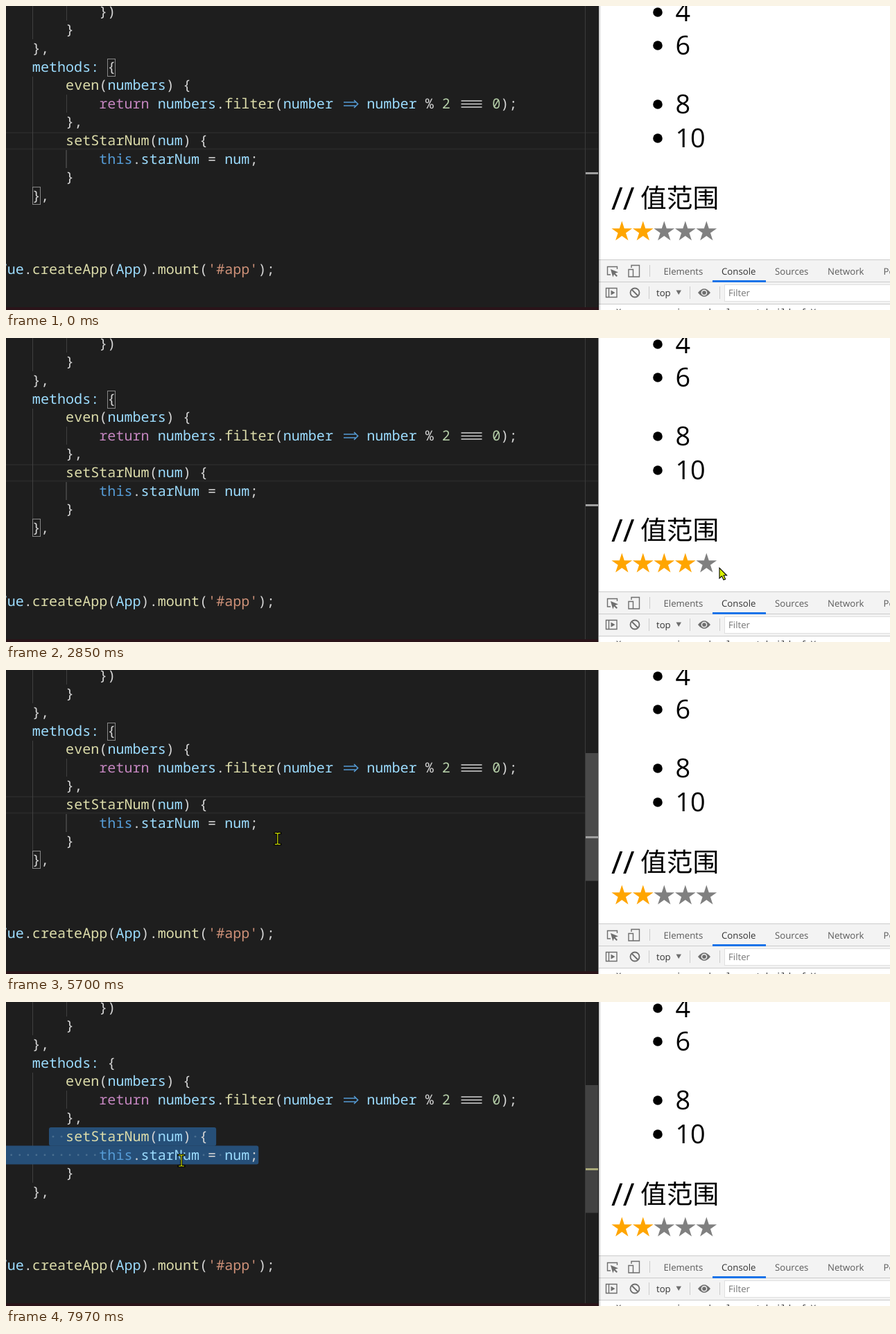
An HTML page for the animation above (8 s loop, 1275 by 439 pixels).

```html
<!DOCTYPE html>
<html lang="zh">
<head>
<meta charset="utf-8">
<title>Star rating</title>
<style>
  html, body { margin: 0; height: 100%; overflow: hidden; background: #1e1e1e; }
  svg { display: block; width: 100vw; height: 100vh; }
  text { white-space: pre; text-rendering: geometricPrecision; }
  .code { font: 500 20.1px "Noto Sans Mono", "DejaVu Sans Mono", monospace; }
  .page { font: 37.8px "Open Sans", "Noto Sans", sans-serif; }
  .slash { font: 45px "Noto Sans", "Open Sans", sans-serif; }
  .cjk { font: 37.7px "Noto Sans CJK SC", "Noto Sans CJK JP", "Noto Sans CJK", sans-serif; }
  .tool { font: 13.2px "Open Sans", "Noto Sans", sans-serif; }
  .log { font: 12px "Noto Sans Mono", monospace; }
</style>
</head>
<body>
<svg id="stage" viewBox="0 0 1275 439"></svg>
<script>
const LOOP = 8000;
const CW = 12.06, LH = 26.6, X0 = -10.4, Y0 = -5.2;
const stage = document.getElementById('stage');

function add(parent, tag, attrs, text) {
  const node = document.createElementNS('http://www.w3.org/2000/svg', tag);
  set(node, attrs);
  if (text) node.textContent = text;
  parent.append(node);
  return node;
}
function set(node, attrs) {
  for (const k in attrs) node.setAttribute(k, attrs[k]);
}
const group = (parent = stage) => add(parent, 'g', {});
const rect = (p, x, y, width, height, fill, more) =>
  add(p, 'rect', { x, y, width, height, fill, ...more });
const stroke = (p, d, color, w = 1, more) =>
  add(p, 'path', { d, stroke: color, 'stroke-width': w, fill: 'none', ...more });
const label = (p, cls, x, y, fill, text) => add(p, 'text', { class: cls, x, y, fill }, text);
const show = (node, on) => node.setAttribute('visibility', on ? 'visible' : 'hidden');
const colX = c => X0 + c * CW;
const rowY = r => Y0 + r * LH;

// Editor
const INK = { v: '#9cdcfe', f: '#dcdcaa', c: '#c586c0', k: '#569cd6', n: '#b5cea8', s: '#ce9178', d: '#d4d4d4' };
// row, column, then colour key and text in turn
const LINES = [
  [0, 12, 'd', '})'],
  [1, 8, 'd', '}'],
  [2, 4, 'd', '},'],
  [3, 4, 'v', 'methods:', 'd', ' {'],
  [4, 8, 'f', 'even', 'd', '(', 'v', 'numbers', 'd', ') {'],
  [5, 12, 'c', 'return ', 'v', 'numbers', 'd', '.', 'f', 'filter', 'd', '(', 'v', 'number',
    'd', '    ', 'v', 'number', 'd', ' % ', 'n', '2', 'd', '     ', 'n', '0', 'd', ');'],
  [6, 8, 'd', '},'],
  [7, 8, 'f', 'setStarNum', 'd', '(', 'v', 'num', 'd', ') {'],
  [8, 12, 'k', 'this', 'd', '.', 'v', 'starNum', 'd', ' = ', 'v', 'num', 'd', ';'],
  [9, 8, 'd', '}'],
  [10, 4, 'd', '},'],
  [14, 0, 'v', 'Vue', 'd', '.', 'f', 'createApp', 'd', '(', 'v', 'App', 'd', ').', 'f', 'mount',
    'd', '(', 's', "'#app'", 'd', ');']
];
const plain = [];

rect(stage, 0, 0, 855, 439, '#1e1e1e');
rect(stage, 0, 435, 855, 4, '#2a1419');
const lineMark = group();
rect(lineMark, 0, 1, 854, 2, '#282828');
rect(lineMark, 0, 24.5, 854, 2, '#282828');
stroke(stage, 'M38.5 0V48M87.5 0V21M38.5 102V261M87.5 128V154', '#404040');
stroke(stage, 'M87 208V234', '#606060');
const selection = group();
const brackets = group();
for (const [x, y] of [[146.5, 76.5], [38.5, 261.5]])
  rect(brackets, x, y, 11, 25, 'none', { stroke: '#888' });

for (const [row, start, ...parts] of LINES) {
  let col = start;
  plain[row] = ' '.repeat(start);
  for (let i = 0; i < parts.length; i += 2) {
    const text = parts[i + 1];
    // baselines sit on whole pixels
    if (text.trim()) label(stage, 'code', colX(col), Math.round(rowY(row) + 20), INK[parts[i]], text);
    plain[row] += text;
    col += text.length;
  }
}
stroke(stage, 'M487 139H504M487 144H504M502 136L507.5 141.5L502 147', INK.k, 1.6);
stroke(stage, 'M656.5 137H686.5M656.5 141.5H686.5M656.5 146H686.5', INK.d, 1.7);

rect(stage, 835, 0, 1, 435, '#3a3a3a');
const slider = rect(stage, 836, 120, 18, 184.5, '#424242');
const selMark = rect(stage, 836, 240, 18, 3, '#1f3f5f');
const caretMark = rect(stage, 836, 240, 18, 3, '#a0a0a0');
const caret = rect(stage, 0, 0, 2, LH, '#d8d8d8');

// Page
rect(stage, 855, 0, 420, 439, '#fff');
for (const [y, text] of [[9, '4'], [57, '6'], [142, '8'], [191, '10']]) {
  add(stage, 'circle', { cx: 940, cy: y, r: 6.8, fill: '#000' });
  label(stage, 'page', 965.5, y + 13.3, '#000', text);
}
label(stage, 'slash', 873, 293.5, '#000', '//');
label(stage, 'cjk', 915, 291, '#000', '值范围');

const starPoints = (cx, cy, r) => Array.from({ length: 10 }, (_, i) => {
  const a = i * Math.PI / 5, q = i % 2 ? r * 0.382 : r;
  return [cx + q * Math.sin(a), cy - q * Math.cos(a)].map(v => v.toFixed(2)).join();
}).join(' ');
const stars = [0, 1, 2, 3, 4].map(i =>
  add(stage, 'polygon', { points: starPoints(888.3 + i * 30.5, 326, 15.6) }));

// Developer tools
const GREY = '#6e6e6e';
rect(stage, 855, 366, 420, 65, '#f3f3f3');
for (const y of [366, 398, 430]) rect(stage, 855, y, 420, 1, '#cccccc');
stroke(stage, 'M872 388H867.5V376.5H881.5V380', GREY, 1.4);
add(stage, 'path', { d: 'M872 380L883 384.5L878.5 386L882 389.5L880.5 391L877 387.5L875.3 391.5Z', fill: GREY });
stroke(stage, 'M902 378V374.5H913.5V391H905M898 380.5H904.5V391H898Z', GREY, 1.4);
rect(stage, 928, 374, 1, 17, '#ccc');
label(stage, 'tool', 948.5, 388, '#5a5a5a', 'Elements');
label(stage, 'tool', 1032, 388, '#333', 'Console');
label(stage, 'tool', 1109, 388, '#5a5a5a', 'Sources');
label(stage, 'tool', 1185, 388, '#5a5a5a', 'Network');
label(stage, 'tool', 1265.5, 388, '#5a5a5a', 'Performance');
rect(stage, 1019, 396, 77, 3, '#1a73e8');

stroke(stage, 'M865.5 407.5H881V420.5H865.5ZM869.5 407.5V420.5', GREY, 1.4);
add(stage, 'path', { d: 'M872.5 410.5L878.5 414L872.5 417.5Z', fill: GREY });
add(stage, 'circle', { cx: 907, cy: 414, r: 6.5, fill: 'none', stroke: GREY, 'stroke-width': 1.8 });
stroke(stage, 'M902.5 409.5L911.5 418.5', GREY, 1.8);
for (const x of [927, 986, 1029]) rect(stage, x, 405, 1, 18, '#ccc');
label(stage, 'tool', 938, 419, '#333', 'top');
add(stage, 'path', { d: 'M966.5 410.5H974L970.2 417Z', fill: GREY });
add(stage, 'path', { d: 'M998 414Q1007 402.5 1016 414Q1007 425.5 998 414Z', fill: GREY });
add(stage, 'circle', { cx: 1007, cy: 414, r: 3.6, fill: GREY, stroke: '#f3f3f3', 'stroke-width': 1.5 });
rect(stage, 1036.5, 402.5, 245, 24, '#fff', { stroke: '#e0e0e0' });
label(stage, 'tool', 1042, 419, '#757575', 'Filter');
label(stage, 'log', 880, 446, '#333', 'You are running a development build of Vue.');

// The focused window owns the seam: page border, or editor shadow
const border = rect(stage, 854, 0, 1, 439, '#8c8c8c');
const shadow = group();
[0.2, 0.12, 0.06].forEach((a, i) => rect(shadow, 855 + i, 0, 1, 439, '#000', { opacity: a }));

// Pointer
const halo = add(stage, 'circle', { r: 14, fill: '#dcd200', 'fill-opacity': 0.72 });
const arrow = add(stage, 'path', {
  d: 'M0 0V15L3.5 11.8L6 17.2L8.6 16.1L6.2 10.8H10.6Z', fill: '#d8f000', stroke: '#000', 'stroke-width': 1.1
});
const beam = group();
const beamPath = 'M-4-8H-1L0-7L1-8H4M0-7V7M-4 8H-1L0 7L1 8H4';
stroke(beam, beamPath, '#000', 3, { 'stroke-linecap': 'square' });
stroke(beam, beamPath, '#cfe000', 1.2);

// Bursts of movement: start, end, steps
const RUNS = [
  [240, 1000, 11], [1060, 1860, 10], [1930, 2260, 5], [2460, 2850, 5], [3180, 3930, 10], [4060, 4200, 3],
  [4480, 5220, 11], [5290, 6040, 11], [6170, 6950, 12], [7080, 7570, 8], [7770, 7970, 4]
];
// Pointer path: time, x, y
const PATH = [
  [240, 987, 357], [550, 945, 343], [1000, 890, 330], [1300, 890, 327], [1670, 952.5, 322], [1930, 952, 323],
  [2260, 981, 324], [2540, 981, 324], [2850, 1029, 332], [3180, 1026, 330], [3400, 1010, 325],
  [3480, 1010, 325], [3930, 953, 326], [4060, 950, 330], [4200, 941, 330], [4480, 938, 330],
  [4800, 919, 326], [4880, 919, 326], [5220, 884, 329], [5290, 880, 324], [5660, 392, 244],
  [6040, 374, 222], [6300, 369, 220], [6600, 230, 201], [6950, 60, 168], [7080, 46, 162],
  [7570, 59, 191], [7770, 75, 195], [7970, 253, 229]
];
// Clicks: press, release, resulting rating
const CLICKS = [
  [1060, 1270, 1], [1860, 1930, 3], [2460, 2540, 4], [3400, 3480, 5], [4060, 4130, 3], [4800, 4880, 2]
];
const DRAG = { from: 6170, to: 7570, release: 7500, row: 8, col: 31 };

function snap(t) {
  let out = 0;
  for (const [a, b, n] of RUNS) {
    if (t < a) break;
    const gap = (b - a) / (n - 1);
    out = Math.min(b, a + Math.floor((t - a) / gap + 1e-6) * gap);
  }
  return out;
}

function pointerAt(t) {
  const i = PATH.findIndex(k => k[0] > t);
  if (i < 1) return i ? PATH[PATH.length - 1].slice(1) : PATH[0].slice(1);
  const [a, x, y] = PATH[i - 1], [b, x2, y2] = PATH[i];
  const f = (t - a) / (b - a);
  return [x + (x2 - x) * f, y + (y2 - y) * f];
}

function select(row, col) {
  for (let r = row; r <= DRAG.row; r++) {
    const from = r === row ? col : 0;
    const to = r === DRAG.row ? DRAG.col : plain[r].length;
    if (r === DRAG.row && from >= to) return;
    const right = colX(to) + (r === DRAG.row ? 0.8 : CW);
    rect(selection, colX(from), rowY(r), right - colX(from), LH + 0.2, '#264f78', { rx: 3 });
    for (let c = from; c < to; c++)
      if (plain[r][c] === ' ')
        add(selection, 'circle', { cx: colX(c + 0.5), cy: rowY(r) + 13.3, r: 1.4, fill: '#4a6f90' });
  }
}

let last = -1;
function draw(now) {
  const t = snap(now);
  if (t === last) return;
  last = t;

  const [x, y] = pointerAt(t);
  const inEditor = x < 835;
  const onText = inEditor || (x > 874 && x < 1025 && y > 308 && y < 342);
  const pressed = CLICKS.some(c => t >= c[0] && t < c[1]) || (t >= DRAG.from && t < DRAG.release);
  set(halo, { cx: x, cy: y });
  set(arrow, { transform: `translate(${x} ${y})` });
  set(beam, { transform: `translate(${x} ${y})` });
  show(halo, pressed);
  show(arrow, t >= 240 && !onText);
  show(beam, t >= 240 && onText);

  const rating = CLICKS.reduce((n, c) => t >= c[1] ? c[2] : n, 2);
  stars.forEach((s, i) => s.setAttribute('fill', i < rating ? '#ffa500' : '#808080'));

  const dragged = t >= DRAG.from;
  const pageFocus = t >= CLICKS[0][0] && !dragged;
  show(border, pageFocus);
  show(shadow, !pageFocus);

  let row = 7, col = 0, empty = true;
  selection.replaceChildren();
  if (dragged) {
    const [dx, dy] = pointerAt(Math.min(t, DRAG.to));
    row = Math.max(6, Math.min(DRAG.row, Math.floor((dy - Y0) / LH)));
    col = Math.min(plain[row].length, Math.round((dx - X0) / CW));
    empty = row === DRAG.row && col === DRAG.col;
    select(row, col);
  }
  set(lineMark, { transform: `translate(0 ${rowY(row)})` });
  show(lineMark, empty);
  show(brackets, !dragged);
  set(caret, { x: colX(col) - 1, y: rowY(row) });
  show(caret, dragged && t < DRAG.to);

  const above = dragged && row === 6;
  show(slider, t >= 5290 && inEditor);
  slider.setAttribute('fill', dragged ? '#424242' : '#4a4a4a');
  show(selMark, above);
  set(caretMark, { y: above ? 235 : 240, fill: dragged && !above && !empty ? '#a8a878' : '#a0a0a0' });
}

const start = performance.now();
function tick() {
  draw((performance.now() - start) % LOOP);
  requestAnimationFrame(tick);
}
tick();
</script>
</body>
</html>
```
